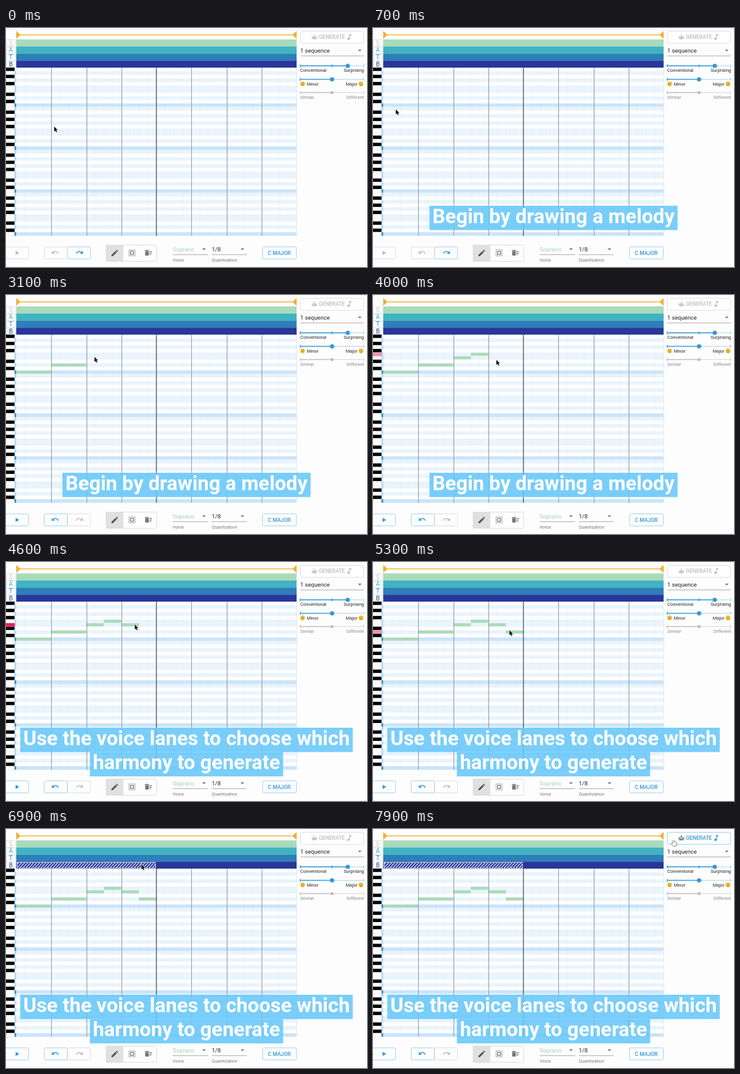
Write an HTML page with a canvas that moves like this. It is 600 px wide and 398 px high and loops after 8 s.

```html
<!DOCTYPE html>
<html lang="en">
<head>
<meta charset="utf-8">
<title>Melody editor</title>
<style>
html, body { margin: 0; width: 100%; height: 100%; overflow: hidden; background: #fdfdfd; }
canvas { display: block; width: 600px; height: 398px; }
</style>
</head>
<body>
<canvas id="stage" width="600" height="398"></canvas>
<script>
const g = document.getElementById('stage').getContext('2d');
const LOOP = 8000, LEFT = 17, RIGHT = 483, TOP = 66, BOTTOM = 346, ROWS = 47;
const ROW = (BOTTOM - TOP) / ROWS, STEP = (RIGHT - LEFT) / 16;
const BLUE = '#3498db', GREY = '#bdbdbd', GREEN = '#addabd', ORANGE = '#f0b031';
const LANES = [['S', '#a9dbba'], ['A', '#41b3c2'], ['T', '#2c7fb8'], ['B', '#28389a']];

// row, first step, length in steps, press time, release time
const NOTES = [
  [10, 0, 2, 1100, 1800], [8, 2, 2, 2150, 2750], [6, 4, 1, 3200, 3350],
  [5, 5, 1, 3600, 3850], [6, 6, 1, 4350, 4700], [8, 7, 1, 4950, 5150]
];
// time, x, y of the pointer tip
const PATH = [
  [0, 80, 164], [300, 78, 160], [900, 24, 127], [1100, 24, 127], [1600, 53, 127],
  [1800, 60, 127], [2150, 84, 116], [2750, 120, 116], [3100, 147, 103], [3350, 149, 104],
  [3600, 175, 98], [3850, 182, 99], [4000, 205, 108], [4350, 203, 104], [4600, 214, 104],
  [4950, 232, 116], [5200, 236, 116], [6000, 24, 60], [6200, 24, 59], [7050, 243, 59],
  [7300, 243, 59], [7800, 500, 18], [8000, 500, 18]
];
const MASK_START = 6200, MASK_END = 7300;

function pointer(t) {
  const i = PATH.findIndex(p => p[0] > t);
  const [a, b] = [PATH[i - 1], PATH[i]];
  const u = (t - a[0]) / (b[0] - a[0]), e = u * u * (3 - 2 * u);
  return [a[1] + (b[1] - a[1]) * e, a[2] + (b[2] - a[2]) * e];
}

function box(x, y, w, h, fill) {
  g.fillStyle = fill;
  g.fillRect(x, y, w, h);
}

function frame(x, y, w, h, color, r = 2) {
  g.strokeStyle = color;
  g.lineWidth = 1;
  g.beginPath();
  g.roundRect(x + .5, y + .5, w - 1, h - 1, r);
  g.stroke();
}

function line(x1, y1, x2, y2, color, width = 1) {
  g.strokeStyle = color;
  g.lineWidth = width;
  g.beginPath();
  g.moveTo(x1, y1);
  g.lineTo(x2, y2);
  g.stroke();
}

function disc(x, y, r, color) {
  g.fillStyle = color;
  g.beginPath();
  g.arc(x, y, r, 0, 7);
  g.fill();
}

function shape(d, x, y, scale, color) {
  g.save();
  g.translate(x, y);
  g.scale(scale, scale);
  g.fillStyle = color;
  g.fill(new Path2D(d));
  g.restore();
}

function text(s, x, y, size, color, weight = 400, align = 'left') {
  g.font = `${weight} ${size}px Roboto, sans-serif`;
  g.textAlign = align;
  g.fillStyle = color;
  g.fillText(s, x, y);
}

const pitch = row => (22 + 36 - row) % 12;
const isBlack = row => [1, 3, 6, 8, 10].includes(pitch(row));

function drawLanes(t, x) {
  line(LEFT, 11.5, RIGHT, 11.5, ORANGE, 1.5);
  shape('M0 0L7 6.5L0 13Z', LEFT, 5, 1, ORANGE);
  shape('M0 0L-7 6.5L0 13Z', RIGHT, 5, 1, ORANGE);
  LANES.forEach(([name, color], i) => {
    const y = 19 + i * 11.75;
    box(LEFT, y, RIGHT - LEFT, 11.75, color);
    box(0, y, LEFT, 11.75, '#fff');
    frame(0, Math.round(y), 16, 12, i ? '#c5dcea' : '#dedede', 1);
    text(name, 8, y + 9.6, 10, i ? ['', '#3aa5b8', '#2c7fb8', '#28389a'][i] : '#c4c4c4', 400, 'center');
  });
  if (t < MASK_START) return;
  const steps = t >= MASK_END ? 8 : Math.min(8, Math.max(1, Math.ceil((x - LEFT) / STEP)));
  const w = steps * STEP - 2;
  g.save();
  g.beginPath();
  g.rect(LEFT + 1, 55.5, w, 9.5);
  g.clip();
  for (let s = LEFT - 10; s < LEFT + w + 10; s += 5) line(s, 66, s + 10, 55, '#dfe3f4', 1.3);
  g.restore();
  g.setLineDash([3, 1]);
  frame(LEFT + 1, 55, w, 10.5, '#fff', 0);
  g.setLineDash([]);
}

function drawGrid(t) {
  box(0, TOP, RIGHT, BOTTOM - TOP, '#fff');
  for (let r = 0; r < ROWS; r++) {
    const y = TOP + r * ROW, root = pitch(r) === 0;
    if (!isBlack(r)) {
      box(LEFT, y, RIGHT - LEFT, ROW, root ? '#cbe5fa' : '#e9f4fd');
      box(14, y, 3, ROW, root ? BLUE : '#b4d9f5');
      line(0, y + ROW, 14, y + ROW, '#e0e0e0', .6);
    } else {
      box(0, y, 14.5, ROW - .4, '#000');
      box(14.5, y, 2.5, ROW, '#e3eef6');
    }
  }
  for (let i = 1; i < 32; i++) {
    const x = LEFT + i * STEP / 2;
    line(x, TOP, x, BOTTOM, 'rgba(120,170,210,.1)', .8);
  }
  const [x] = pointer(t);
  for (const [row, start, len, on, off] of NOTES) {
    if (t < on) continue;
    const y = TOP + row * ROW, left = LEFT + start * STEP;
    const size = t >= off ? len : Math.min(len, Math.max(1, Math.ceil((x - left) / STEP)));
    box(left, y + .3, size * STEP, ROW - .8, GREEN);
    g.globalAlpha = Math.max(0, Math.min(1, 1 - (t - off) / 300));
    box(0, y, 14.5, ROW, '#e91e63');
    g.globalAlpha = 1;
  }
  for (let i = 1; i < 8; i++) {
    const bar = Math.round(LEFT + i * STEP * 2);
    line(bar + (i === 4 ? 0 : .5), TOP, bar + (i === 4 ? 0 : .5), BOTTOM, i === 4 ? '#555' : '#8d969d', i === 4 ? 1.4 : 1);
  }
  line(RIGHT, TOP, RIGHT, BOTTOM, '#dbe6ef');
}

function face(x, y, mood) {
  disc(x, y, 4, '#f6c344');
  disc(x - 1.4, y - .9, .6, '#795421');
  disc(x + 1.4, y - .9, .6, '#795421');
  g.strokeStyle = '#795421';
  g.lineWidth = .8;
  g.beginPath();
  if (mood > 0) g.arc(x, y + .5, 1.9, .3, 2.8);
  else g.arc(x, y + 3, 1.8, 3.5, 5.9);
  g.stroke();
}

function slider(y, thumb, color, rest, labels, ink) {
  line(489, y, 595, y, rest, 1.2);
  line(489, y, thumb, y, color, 1.4);
  for (const x of [489, 542, 594.5]) line(x, y - 2.5, x, y + 2.5, x > thumb ? rest : color, 1.3);
  disc(thumb, y, color === BLUE ? 3.6 : 2.5, color);
  text(labels[0], labels[2] || 489, y + 10, 7.5, ink);
  text(labels[1], labels[3] || 595, y + 10, 7.5, ink, 400, 'right');
}

function select(value, label, x, right, y, color) {
  text(value, x, y, 9.7, color);
  shape('M0 0H6L3 3Z', right - 10, y - 5, 1, '#757575');
  line(x, y + 5.5, right, y + 5.5, '#999', .8);
  text(label, x, y + 16.5, 7.5, '#757575');
}

function drawPanel(t) {
  const ready = t >= MASK_END, ink = ready ? BLUE : GREY;
  box(489, 5, 106, 21, '#fff');
  frame(489, 5, 106, 21, ready ? '#9dccee' : '#dedede');
  g.globalAlpha = ready ? 1 : .3;
  box(509, 13, 7, 6, '#8196a7');
  box(507.5, 14.5, 10, 3, '#8196a7');
  line(512.5, 10, 512.5, 13, '#d4513f', 1.5);
  disc(511, 15, .9, '#fff');
  disc(514, 15, .9, '#fff');
  box(510.5, 17.2, 4, 1, '#d4513f');
  g.globalAlpha = 1;
  text('GENERATE', 520, 18.3, 8.8, ink, 500);
  line(571, 10, 571, 18, ink, 1.3);
  line(571, 10.6, 574, 12.2, ink, 1.7);
  disc(569.3, 18, 2, ink);

  text('1 sequence', 489, 41, 9.6, '#222');
  shape('M0 0H6L3 3Z', 585, 36, 1, '#757575');
  line(489, 46.5, 595, 46.5, '#999', .8);
  slider(63, 568, BLUE, '#a9d3f0', ['Conventional', 'Surprising'], '#222');
  slider(85.5, 542, BLUE, '#a9d3f0', ['Minor', 'Major', 500, 584], '#222');
  face(493, 93, -1);
  face(590, 93, 1);
  slider(107.5, 542, GREY, '#d5d5d5', ['Similar', 'Different'], '#888');
}

const ARROW = 'M12.5 8c-2.65 0-5.05.99-6.9 2.6L2 7v9h9l-3.62-3.62c1.39-1.16 3.16-1.88 5.12-1.88 3.54 0 6.55 2.31 7.6 5.5l2.37-.78C21.08 11.03 17.15 8 12.5 8z';

function drawToolbar(t) {
  const played = t >= NOTES[0][3], edited = t >= NOTES[0][4];
  const edge = on => on ? '#a6d1ef' : '#dedede', ink = on => on ? BLUE : GREY;
  box(0, 347, 484, 51, '#fdfdfd');
  frame(-4, 364, 42, 21, edge(played));
  shape('M0 0V7L6 3.5Z', 16, 371, 1, ink(played));
  frame(102, 364, 39, 21, edge(!edited));
  frame(63, 364, 39.5, 21, edge(edited));
  shape(ARROW, 75, 367, .57, ink(edited));
  g.save();
  g.translate(129, 367);
  g.scale(-1, 1);
  shape(ARROW, 0, 0, .57, ink(!edited));
  g.restore();

  box(166, 361, 29, 28, '#e0e0e0');
  frame(166, 361, 85, 28, '#dcdcdc');
  shape('M3 17.25V21h3.75L17.81 9.94l-3.75-3.75zM20.71 7.04a1 1 0 0 0 0-1.41l-2.34-2.34a1 1 0 0 0-1.41 0l-1.83 1.83 3.75 3.75z', 173.5, 367.5, .6, '#555');
  g.setLineDash([1.3, 1.2]);
  frame(204, 369, 11, 11, '#666', 0);
  g.setLineDash([]);
  g.lineWidth = 1.2;
  g.strokeRect(207, 372, 5, 5);
  shape('M15 16h4v2h-4zM15 8h7v2h-7zM15 12h6v2h-6zM3 18a2 2 0 0 0 2 2h6a2 2 0 0 0 2-2V8H3zM14 5h-3l-1-1H6L5 5H2v2h12z', 229.5, 367, .6, '#777');

  select('Soprano', 'Voice', 277, 336, 372, '#a1d3b1');
  select('1/8', 'Quantization', 342, 400, 372, '#222');
  frame(426, 364, 57, 21, '#a6d1ef');
  text('C MAJOR', 454.3, 377.7, 8.8, BLUE, 500, 'center');
}

function caption(lines, top) {
  g.font = '700 33.4px Roboto, sans-serif';
  lines.forEach((s, i) => {
    const w = g.measureText(s).width + 10, y = top + i * 40.5;
    box(300 - w / 2, y, w, 40.5, 'rgba(104,200,250,.88)');
    text(s, 300, y + 28.6, 33.4, '#fff', 700, 'center');
  });
}

function drawPointer([x, y]) {
  g.save();
  g.translate(x, y);
  g.lineJoin = 'round';
  g.strokeStyle = '#fff';
  g.lineWidth = 1.2;
  let p;
  if (x > 488) {
    p = new Path2D('M-1 1Q0 -1 1 1V4L4 4.7Q5 5 4.6 7L4 10H-1.5L-4 6Q-4 4.5 -2.5 5.4L-1 6.5Z');
    g.fillStyle = '#fff';
    g.strokeStyle = '#111';
    g.lineWidth = 1;
  } else {
    p = new Path2D('M0 0V8.5L2 6.7L3.4 9.8L4.9 9.1L3.5 6.1H6Z');
    g.fillStyle = '#111';
  }
  g.stroke(p);
  g.fill(p);
  g.restore();
}

function draw(now) {
  const t = now % LOOP, tip = pointer(t);
  box(0, 0, 600, 398, '#fdfdfd');
  drawGrid(t);
  drawLanes(t, tip[0]);
  drawPanel(t);
  drawToolbar(t);
  drawPointer(tip);
  if (t >= 4600) caption(['Use the voice lanes to choose which', 'harmony to generate'], 276);
  else if (t >= 400) caption(['Begin by drawing a melody'], 296);
  requestAnimationFrame(draw);
}
requestAnimationFrame(draw);
</script>
</body>
</html>
```
